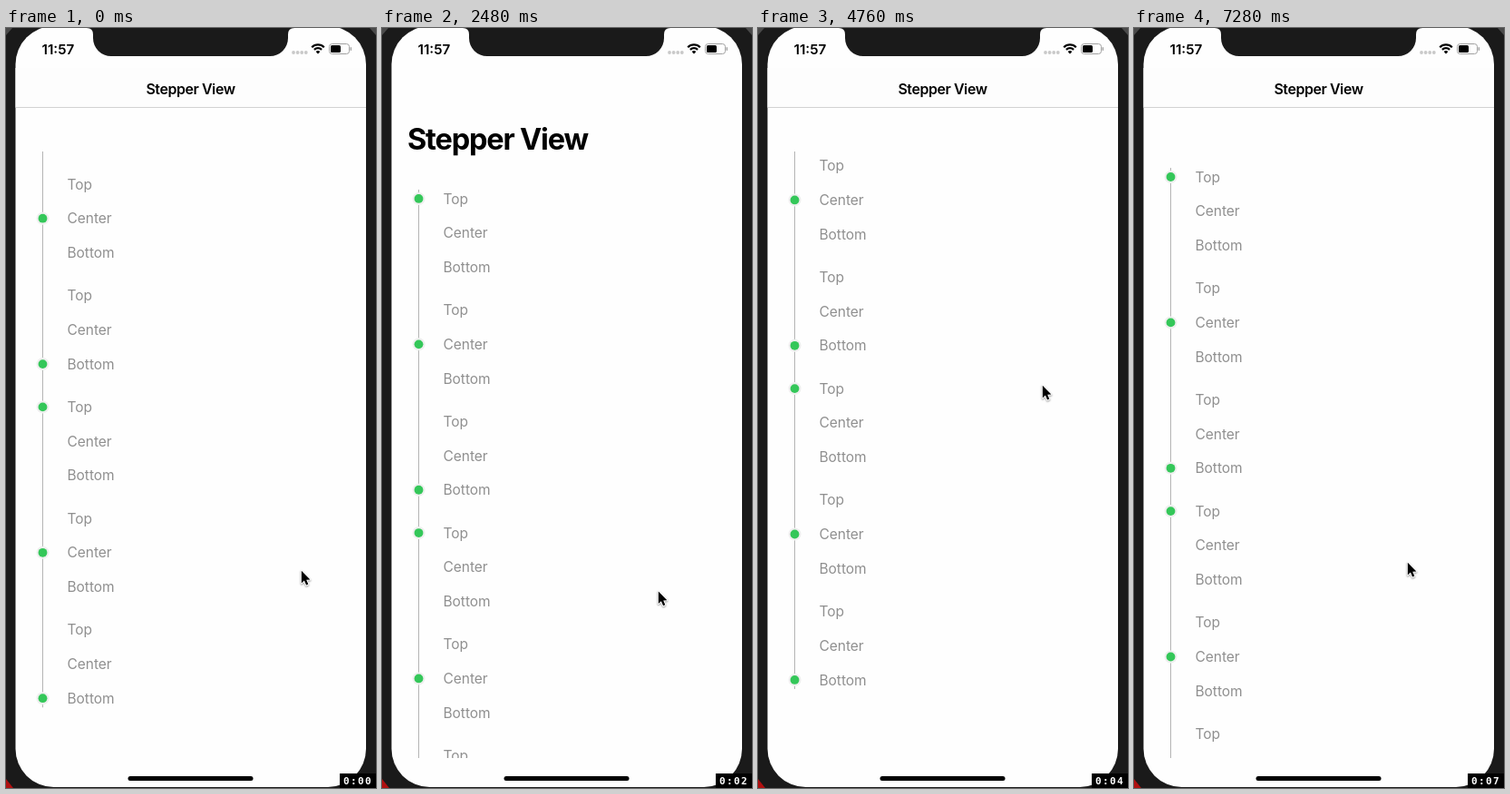
An HTML page with a canvas that plays this animation: 408x837 px, repeating every 8000 ms.

```html
<!DOCTYPE html>
<html lang="en">
<head>
<meta charset="utf-8">
<title>Stepper View</title>
<style>
  html, body { margin: 0; width: 100%; height: 100%; overflow: hidden; background: #1a1a1a; }
  canvas { display: block; width: 408px; height: 837px; }
</style>
</head>
<body>
<canvas id="stage"></canvas>
<script>
const W = 408, H = 837, LOOP = 8000;
const canvas = document.getElementById('stage');
const ctx = canvas.getContext('2d');
const dpr = window.devicePixelRatio || 1;
canvas.width = W * dpr;
canvas.height = H * dpr;

const SANS = 'Inter, "Open Sans", sans-serif';
const MONO = '"DejaVu Sans Mono", monospace';

// Bursts of screen updates: start, end, number of updates
const BURSTS = [
  [110, 710, 11], [950, 1690, 13], [1780, 2180, 7], [2360, 2840, 9], [3070, 3830, 13],
  [3890, 4640, 13], [4760, 5400, 11], [5580, 5990, 8], [6280, 6870, 10], [7040, 7280, 5]
];

// Pointer tip: time, x, y
const POINTER = [
  [0, 325, 597], [110, 324, 592], [710, 302, 432], [950, 301, 434], [1382, 301, 495],
  [2180, 304, 621], [3070, 304, 617], [3260, 304, 586], [3952, 308, 465], [4640, 313, 393],
  [5580, 313, 393], [5990, 313, 465], [6280, 312, 470], [6870, 301, 570],
  [7040, 301, 572], [7280, 301, 588]
];

// Scroll limits, as the height of the first label
const LOW = 76, HIGH = 176;
const VIEW_TOP = 136, VIEW_BOTTOM = 804;
const GROUP = 122.7, ROW = 37.7;
const LABELS = ['Top', 'Center', 'Bottom'];

const clamp = (v, a, b) => Math.min(b, Math.max(a, v));
const ramp = (t, a, b) => clamp((t - a) / (b - a), 0, 1);

// The screen only refreshes in steps and holds in between
function snap(t) {
  let out = 0;
  for (const [a, b, n] of BURSTS) {
    if (t < a - 3) break;
    const step = (b - a) / (n - 1);
    out = a + step * clamp(Math.floor((t - a) / step + 0.06), 0, n - 1);
  }
  return out;
}

function pointerAt(t) {
  let i = 1;
  while (i < POINTER.length - 1 && POINTER[i][0] < t) i++;
  const [t0, x0, y0] = POINTER[i - 1], [t1, x1, y1] = POINTER[i];
  const k = ramp(t, t0, t1);
  return { x: x0 + (x1 - x0) * k, y: y0 + (y1 - y0) * k };
}

function band(y) {
  const size = VIEW_BOTTOM - VIEW_TOP;
  const soft = d => size * (1 - 1 / (d * 0.55 / size + 1));
  if (y < LOW) return LOW - soft(LOW - y);
  if (y > HIGH) return HIGH + soft(y - HIGH);
  return y;
}

function bounce(rest, offset, ms) {
  const x = 14.5 * Math.max(0, ms) / 1000;
  return rest + offset * (1 + x) * Math.exp(-x);
}

function scrollAt(t) {
  const y = pointerAt(t).y;
  if (t < 950) return bounce(LOW, -26.7, t - 70);
  if (t < 2308) return band(Math.max(LOW, 130.5 + y - 495));
  if (t < 3070) return bounce(HIGH, 41.5, t - 2308);
  if (t < 4715) return band(Math.min(HIGH, 161 + y - 586));
  if (t < 5580) return bounce(LOW, -54.6, t - 4715);
  if (t < 7040) return Math.min(148, LOW + y - 393);
  return 148 + y - 572;
}

function text(str, x, y, font, color, spacing = 0, align = 'left') {
  ctx.font = font;
  ctx.fillStyle = color;
  ctx.textAlign = align;
  ctx.letterSpacing = spacing + 'px';
  ctx.fillText(str, x, y);
}

function disc(x, y, r, color) {
  ctx.fillStyle = color;
  ctx.beginPath();
  ctx.arc(x, y, r, 0, Math.PI * 2);
  ctx.fill();
}

function box(x, y, w, h, r, color) {
  ctx.fillStyle = color;
  ctx.beginPath();
  ctx.roundRect(x, y, w, h, r);
  ctx.fill();
}

function poly(points, color) {
  ctx.fillStyle = color;
  ctx.beginPath();
  points.forEach(([x, y]) => ctx.lineTo(x, y));
  ctx.closePath();
  ctx.fill();
}

function drawPhone() {
  box(0, 0, W, H, 0, '#1a1a1a');
  poly([[0, 0], [7, 0], [0, 8]], '#4a4a4a');
  poly([[W, 0], [W - 7, 0], [W, 8]], '#4a4a4a');
  poly([[0, 827], [8, H], [0, H]], '#b01010');
  box(10.5, -2, 386.5, 838, 42, '#fefefe');
}

function drawNotch() {
  ctx.fillStyle = '#1a1a1a';
  ctx.beginPath();
  ctx.moveTo(89, 0);
  ctx.quadraticCurveTo(96, 0, 96, 7);
  ctx.arcTo(96, 31, 116, 31, 20);
  ctx.arcTo(311, 31, 311, 11, 20);
  ctx.lineTo(311, 7);
  ctx.quadraticCurveTo(311, 0, 318, 0);
  ctx.fill();
}

function drawStatus() {
  text('11:57', 39.5, 28.5, '600 15.2px ' + SANS, '#000');
  for (let i = 0; i < 4; i++) disc(317 + i * 4.6, 27, 1.9, '#c9c9c9');

  // Wireless arcs
  ctx.strokeStyle = '#000';
  ctx.lineWidth = 2.2;
  for (const r of [5.8, 9.6]) {
    ctx.beginPath();
    ctx.arc(344, 28, r, -Math.PI * 0.75, -Math.PI * 0.25);
    ctx.stroke();
  }
  ctx.fillStyle = '#000';
  ctx.beginPath();
  ctx.moveTo(344, 28.5);
  ctx.arc(344, 28.5, 3.4, -Math.PI * 0.75, -Math.PI * 0.25);
  ctx.fill();

  // Battery
  ctx.strokeStyle = '#a0a0a0';
  ctx.lineWidth = 1;
  ctx.beginPath();
  ctx.roundRect(356.5, 17.5, 22, 11, 3);
  ctx.stroke();
  box(358, 19, 11, 8, 1.5, '#000');
  box(379.6, 21, 1.4, 4, 0.7, '#a0a0a0');
}

function drawSteps(top) {
  ctx.save();
  ctx.beginPath();
  ctx.rect(11, VIEW_TOP, 386, VIEW_BOTTOM - VIEW_TOP);
  ctx.clip();
  const last = top + GROUP * 5 + ROW * 2;
  box(40, top - 10, 1, last - top + 20, 0, '#b4b4b4');
  for (let g = 0; g < 6; g++) {
    LABELS.forEach((label, i) => {
      const y = top + g * GROUP + i * ROW;
      text(label, 67.4, y + 5.6, '400 15.5px ' + SANS, '#8f8f8f');
      if (g % 3 === i) {
        disc(40.5, y, 7, '#efefef');
        disc(40.5, y, 4.9, '#34c759');
      }
    });
  }
  ctx.restore();
}

function drawHeader(t, top) {
  const large = ramp(t, 1640, 1760) - ramp(t, 3070, 3200);
  const small = 1 - ramp(t, 1640, 1830) + ramp(t, 3290, 3480);
  const over = top - HIGH;

  ctx.save();
  ctx.globalAlpha = large;
  ctx.translate(28, 122 + over);
  const grow = 1 + 0.0012 * Math.max(0, over);
  ctx.scale(grow, grow);
  text('Stepper View', 0, 0, '700 32px ' + SANS, '#000', -1.15);
  ctx.restore();

  ctx.save();
  ctx.globalAlpha = 1 - large;
  box(10.5, 44, 386.5, 43, 0, '#fdfdfd');
  box(10.5, 87, 386.5, 1, 0, '#d2d2d2');
  ctx.globalAlpha = small;
  text('Stepper View', 203.5, 72.8, '600 15.9px ' + SANS, '#000', -0.4, 'center');
  ctx.restore();
}

function drawPointer({ x, y }) {
  ctx.save();
  ctx.translate(x + 0.8, y + 0.8);
  ctx.beginPath();
  [[0, 0], [0, 13.6], [3.1, 10.8], [5.3, 15.8], [7.5, 14.8], [5.4, 10], [9.6, 9.8]]
    .forEach(p => ctx.lineTo(...p));
  ctx.closePath();
  ctx.lineJoin = 'round';
  ctx.lineWidth = 2;
  ctx.strokeStyle = '#fff';
  ctx.shadowColor = 'rgba(0,0,0,0.4)';
  ctx.shadowBlur = 2 * dpr;
  ctx.shadowOffsetY = dpr;
  ctx.stroke();
  ctx.shadowColor = 'transparent';
  ctx.fillStyle = '#000';
  ctx.fill();
  ctx.restore();
}

function drawTimer(t) {
  box(368, 821, 40, 16, 0, '#000');
  text('0:0' + Math.floor(t / 1000), 372, 832.5, '700 11px ' + MONO, '#fff', 1.38);
}

function draw(time) {
  const t = snap(time);
  const top = scrollAt(t);
  ctx.setTransform(dpr, 0, 0, dpr, 0, 0);
  drawPhone();
  drawSteps(top);
  drawHeader(t, top);
  drawNotch();
  drawStatus();
  box(134.5, 824, 138, 5, 2.5, '#000');
  drawPointer(pointerAt(t));
  drawTimer(t);
}

const start = performance.now();
function tick() {
  draw((performance.now() - start) % LOOP);
  requestAnimationFrame(tick);
}
tick();
</script>
</body>
</html>
```
